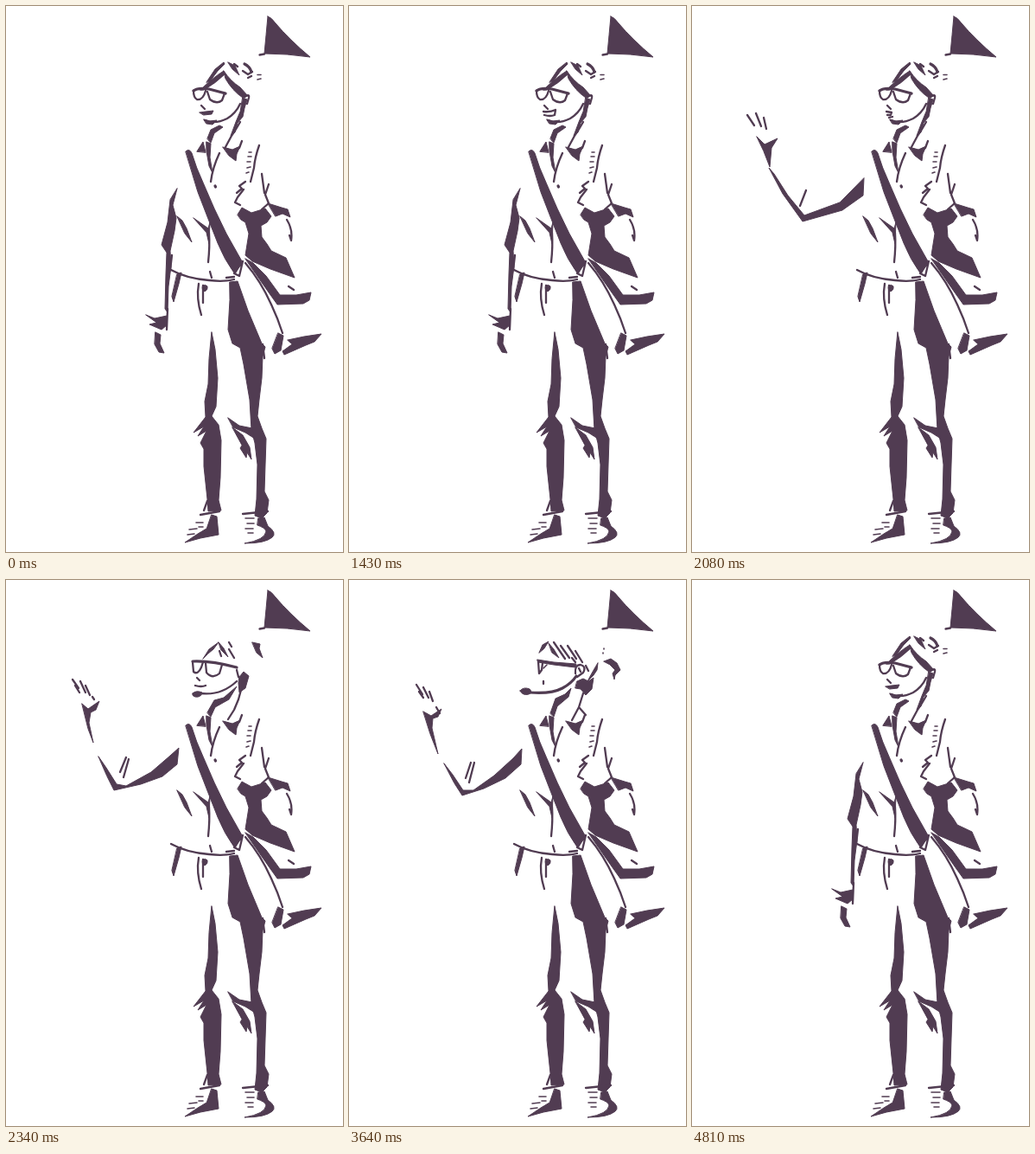
An HTML page for the animation above (5070 ms loop, 390 px wide and 631 px high).

```html
<!DOCTYPE html>
<html lang="en">
<head>
<meta charset="utf-8">
<title>Sketched guide</title>
<style>
html, body { margin: 0; width: 100%; height: 100%; overflow: hidden; background: #fff; }
svg { display: block; width: 390px; height: 631px; }
path { fill: #513c52; stroke: #513c52; stroke-width: 1; stroke-linejoin: round; stroke-linecap: round; }
.l { fill: none; stroke-width: 2.3; }
.t { fill: none; stroke-width: 1.6; }
.b { fill: none; stroke-width: 3.2; }
[data-pose] { opacity: 0; }
</style>
</head>
<body>
<svg viewBox="0 0 390 631">
  <!-- flag -->
  <path d="M303 12Q307 13 312 20Q328 39 352 59Q325 55 299 55Q301 34 303 12Z"/>
  <path class="l" d="M293.500 56.500L299 55.500"/>

  <!-- shirt -->
  <path d="M221 168L228 157L231 169Z"/>
  <path d="M232 157L237 159L236 175L239 193L235 185L232 168Z"/>
  <path d="M251 163L262 166L271 162L267 171L266 179L258 173Z"/>
  <path class="l" d="M273 156L270 164M247 170Q239 187 237 203"/>
  <path d="M208 168Q212 164 215 170Q220 187 228 204L241 234L255 263L273 295L265 310Q252 292 245 274L234 246L222 215Z"/>
  <path class="b" d="M242 208L242.500 209"/>
  <path d="M198 243L204 248L209 257L215 273L207 263Z"/>
  <path d="M217 245L234 257L236 250L235 275L232 262Z"/>
  <path class="l" d="M235 262Q236 278 234 296M236 307L238 314"/>
  <path class="l" d="M293 161Q288 175 287 187L283 203"/>
  <path class="t" d="M281 169h3M280 174h4M279 180h4M279 187l4 -1M278 193l3 -1"/>
  <path class="l" d="M277 203L270 208L273 211L267 216M275 212L268 221L265 227L271 230"/>
  <path class="l" d="M296 194L299 216M304 206L300 218L304 228L296 235"/>

  <!-- far arm -->
  <path d="M268 241L273 233L284 239L300 234L307 243L302 250L295 254L296 267L302 275L307 283L324 291L334 314L306 304L285 295L277 288L281 263L277 250L272 247Z"/>
  <path d="M303 228L319 233L326 235L329 244L320 240L312 243Z"/>
  <path class="l" d="M325 247Q332 258 330 271L328 265"/>

  <!-- bag -->
  <path d="M277 292L286 297L301 312L317 334L336 334L353 331L351 340L344 344L314 345L304 331L290 311Z"/>
  <path class="l" d="M264 309L274 295L270 312Z"/>
  <path class="l" d="M277 297Q295 318 307 345Q315 362 320 378"/>
  <path d="M315 378L321 381L318 398L311 402L308 396Z"/>
  <path class="l" d="M327 324L333 328"/>
  <path d="M326 386L345 382L365 379L357 388L347 392L322 403L320 399L331 391Z"/>

  <!-- trousers -->
  <path class="l" d="M191 305Q209 315 235 317Q252 319 264 316M255 314L264 313"/>
  <path d="M198 310L203 308L200 321L194 342L192 336Z"/>
  <path class="l" d="M223 321Q220 338 226 357M228 323L228 343"/>
  <path d="M227.500 324Q230 321 233 324Q234 328 230 330Q226 328 227.500 324Z"/>
  <path d="M259 319L268 318L280 352L296 390L300 394L297 405L296 430L293 455L291 474L296 488L301 500L300 530L299 561L304 571L302 586L296 592L288 589L290 570L291 530L288 505L284 490L282 455L275 414L271 395L262 390L257 374L259 340Z"/>
  <path class="l" d="M297 391L299 407"/>
  <path d="M257 476L270 485L285 488L288 500L277 493L263 487Z"/>
  <path d="M262 487L274 496L282 510L284 524L279 516L278 522L271 511L273 508Z"/>
  <path d="M238 377L242 397L245 430L243 463L238 474L246 484L249 502L248 545L246 571L249 583L234 584L233 570L229 532L229 512L225 505L232 491L222 497L229 486L217 493L231 475L230 457L234 437L235 408Z"/>
  <path class="l" d="M233 572L229 583"/>

  <!-- shoes -->
  <path class="l" d="M225 588L247 584M274 587L303 584"/>
  <path class="t" d="M220 597h8M212 605l9 -1M223 602h5M210 611l8 -1M277 592h10M279 598h8M277 604h9M280 609h6"/>
  <path d="M238 588L244 590L246 611L225 615L207 620L222 610L232 604Z"/>
  <path d="M292 592L299 591L303 601Q314 609 308 614Q300 621 276 621Q300 617 301 607Q300 603 291 600Z"/>

  <!-- near arm -->
  <g data-track="arm">
    <g data-pose="down">
      <path d="M198 211L193 230L197 245L195 260L190 283L191 301L188 324L187 354L184 350L185 310L186 285L180 276L187 250L190 224Z"/>
      <path class="l" d="M192 288L190 305M187 350L186 374"/>
      <path d="M162 357L172 361L186 358L186 369L180 374L166 368L174 366Z"/>
      <path d="M173 377L179 380L178 390L183 401L177 400L172 391Z"/>
    </g>
    <g data-pose="lift">
      <path d="M198 215L193 242L184 269L166 303L155 315L134 336L132 330L153 303L171 269Z"/>
      <path d="M140 324L131 347L117 359L122 343L113 339L130 332Z"/>
    </g>
    <g data-pose="bend">
      <path d="M197 236L198 247L181 278L163 303L154 306L121 292L94 278L87 284L80 290L78 287L88 270L82 251L91 263L98 247L104 257L103 261L127 280L153 298L171 269Z"/>
      <path class="l" d="M201 250L211 257"/>
    </g>
    <g data-pose="reach">
      <path d="M198 211L197 231L174 253L134 267L101 247L72 224L65 226L50 235L61 218L43 214L62 212L77 207L75 217L104 238L133 257L171 235Z"/>
    </g>
    <g data-pose="swing">
      <path d="M199 199L198 219L174 236L128 249L105 217L89 187L95 194L111 219L130 242L171 227Z"/>
      <path d="M75 151L84 160L99 153L92 164L90 186L83 168Z"/>
      <path class="l" d="M64 126L72 138M74 124L80 139M83 129L86 142M132 213L125 231"/>
    </g>
    <g data-pose="up">
      <path d="M107 204L116 217L128 236L139 238L168 222L190 203L200 194L198 213L181 227L156 236L125 243L117 227Z"/>
      <path d="M88 143L95 149L108 140L104 150L98 153L96 165L101 188L95 172Z"/>
      <path class="l" d="M77 115L84 125M80 122L85 130M86 117L92 130M92 122L97 133M100 135L102 138"/>
      <path class="l" d="M139 205L132 222M142 207L136 228"/>
    </g>
    <g data-pose="dip">
      <path d="M110 212L120 225L132 243L144 243L168 226L190 206L200 195L199 213L181 229L156 241L131 249L122 235Z"/>
      <path d="M86 152L95 157L107 149L103 158L97 160L96 171L103 201L94 178Z"/>
      <path class="l" d="M78 121L85 132M81 129L86 136M86 124L92 136M93 129L97 140M101 147L105 154M141 211L135 229M145 211L139 234"/>
    </g>
    <g data-pose="drop">
      <path d="M198 218L198 239L181 268L163 291L154 294L122 271L102 248L97 250L87 260L93 246L83 237L98 242L106 233L107 247L130 266L154 284L171 258Z"/>
    </g>
  </g>

  <g data-track="head">
    <g data-pose="front">
      <path d="M232 88L242 73L252 65L253 67L245 75L236 87Z"/>
      <path d="M225 97Q239 83 252 75L253 79Q243 89 229 97Z"/>
      <path d="M252 75Q260 87 271 94L280 104L274 106Q262 98 254 84Z"/>
      <path d="M257 65L265 69L270 80L262 73Z"/>
      <path class="l" d="M264 67L268 70M274 75L280 79L285 76M280 83L284 81"/>
      <path class="b" d="M276 67Q282 70 284 76"/>
      <path class="t" d="M291 79.500h4M291 85l4 -1"/>
      <path class="b" d="M217 98Q222 94 235 96L254 101"/>
      <path class="l" d="M217 98Q217 106 221 108Q228 109 231 98M233 99L236 108Q244 114 250 109L253 101"/>
      <path class="l" d="M276 105Q282 101 281 106L279 113"/>
      <path class="l" d="M226 115L230 119M230 132Q242 137 256 130Q266 124 271 113"/>
      <path d="M229 131L236 133L244 132L239 137L232 136Z"/>
      <path d="M274 106L279 108L276 118L274 128L268 135L265 146L260 150L266 134L271 122Z"/>
      <path d="M233 153L237 143L247 138L251 140L241 147L237 158Z"/>
      <path class="l" d="M271 134Q266 143 261 150L254 163"/>
      <g data-track="mouth">
        <path data-pose="shut" d="M224 123L231 122L240 121L238 125L229 126Z"/>
        <path data-pose="grin" class="l" d="M225 122Q233 123 239 120M226 126Q233 128 238 126L239 120"/>
        <path data-pose="round" class="l" d="M225 122L231 123L230 126L226 126M228 129L232 128"/>
        <path data-pose="flat" class="l" d="M225 123Q232 124 239 121"/>
      </g>
    </g>
    <g data-pose="turn">
      <path d="M228 91L235 80L246 72L240 80L234 85Z"/>
      <path d="M246 72L252 79L257 89L249 81Z"/>
      <path class="l" d="M258 72L261 77M258 80L264 90M247 82L249 88"/>
      <path d="M285 72L294 74L293 79L297 90L290 84Z"/>
      <path class="b" d="M216 94Q237 93 267 101"/>
      <path class="l" d="M216 95L217 106Q222 110 226 101L228 95M231 96L232 107Q239 115 247 108L250 98"/>
      <path class="l" d="M221 113L224 116M219 122Q226 124 231 122M225 131Q249 134 267 117"/>
      <path d="M216 131Q220 127 227 130Q226 136 219 135Q215 134 216 131Z"/>
      <path d="M270 112L275 106L281 111L277 125L270 130L269 119Z"/>
      <path d="M233 153L241 139L252 136L267 123L258 138L242 147L237 158Z"/>
      <path class="l" d="M272 127L269 138L264 150L257 161M267 104L269 112"/>
    </g>
    <g data-pose="aside">
      <path d="M224 88L229 78L240 71L234 80Z"/>
      <path class="l" d="M240 72L251 88M247 71L258 88M256 73L265 88M263 82L269 95"/>
      <path d="M290 80L301 82L306 91L303 103L300 92Z"/>
      <path class="b" d="M216 93L265 101"/>
      <path class="l" d="M217 94L218 108L224 97M228 96L231 107Q239 111 244 99M222 116L225 118M220 123L227 122M217 131Q244 133 265 114"/>
      <path d="M208 130Q212 126 219 130Q217 135 211 134Q208 133 208 130Z"/>
      <path class="l" d="M265 104Q270 97 272 105Q270 112 266 113"/>
      <path d="M269 115L282 111L279 126L272 131Z"/>
      <path d="M233 153L241 138L256 128L256 136L241 146L237 158Z"/>
      <path class="l" d="M271 130L267 145L257 161"/>
    </g>
    <g data-pose="away">
      <path d="M220 84L224 75L231 71L226 79Z"/>
      <path d="M231 73L237 80L243 90L235 84Z"/>
      <path class="l" d="M237 72L250 91M245 76L255 90M253 76L263 91M262 82L270 95M258 90L262 95"/>
      <path d="M218 92L237 95L263 97L262 101L237 98L219 95Z"/>
      <path class="l" d="M219 94L220 108L223 104L224 96M225 117L225 120"/>
      <path class="t" d="M229 98L225 102M295 79v1M294 84v1"/>
      <path d="M198 128Q202 123 209 126Q213 130 208 132Q201 134 198 128Z"/>
      <path class="b" d="M209 130Q234 132 247 125Q258 119 263 111"/>
      <path class="l" d="M262 108Q261 98 268 98Q275 100 271 107L264 112M266 102L268 106M274 99L277 105"/>
      <path d="M288 96L287 104L283 110L276 117L282 106Z"/>
      <path d="M295 94L303 91L310 96L314 104L308 110L307 115L305 108L308 104L302 98Z"/>
      <path d="M264 117L271 114L277 117L283 113L281 126L274 133L268 126L262 125Z"/>
      <path d="M233 154L239 137L250 132L257 125L254 135L241 146L237 158Z"/>
      <path class="l" d="M271 131L266 147L274 156M266 147L258 162"/>
    </g>
  </g>
</svg>
<script>
const LOOP = 5070;
const BEAT = 130;

// Each entry: beat at which a pose starts, pose name.
const tracks = {
  mouth: [[0, 'shut'], [1, 'round'], [2, 'grin'], [3, 'round'], [4, 'shut'], [7, 'flat'],
    [9, 'round'], [11, 'grin'], [13, 'shut'], [14, 'round'], [15, 'grin'], [16, 'round'], [17, 'shut']],
  arm: [[0, 'down'], [13, 'lift'], [14, 'bend'], [15, 'reach'], [16, 'swing'], [17, 'up'],
    [28, 'dip'], [29, 'drop'], [30, 'lift'], [31, 'down']],
  head: [[0, 'front'], [18, 'turn'], [19, 'aside'], [21, 'away'], [35, 'aside'], [36, 'turn'], [37, 'front']]
};

for (const [name, steps] of Object.entries(tracks)) {
  for (const el of document.querySelectorAll(`[data-track=${name}] > [data-pose]`)) {
    const show = pose => pose === el.dataset.pose ? 1 : 0;
    const frames = steps.map(([beat, pose]) =>
      ({ offset: beat * BEAT / LOOP, opacity: show(pose), easing: 'step-end' }));
    frames.push({ offset: 1, opacity: show(steps.at(-1)[1]) });
    el.animate(frames, { duration: LOOP, iterations: Infinity });
  }
}
</script>
</body>
</html>
```
